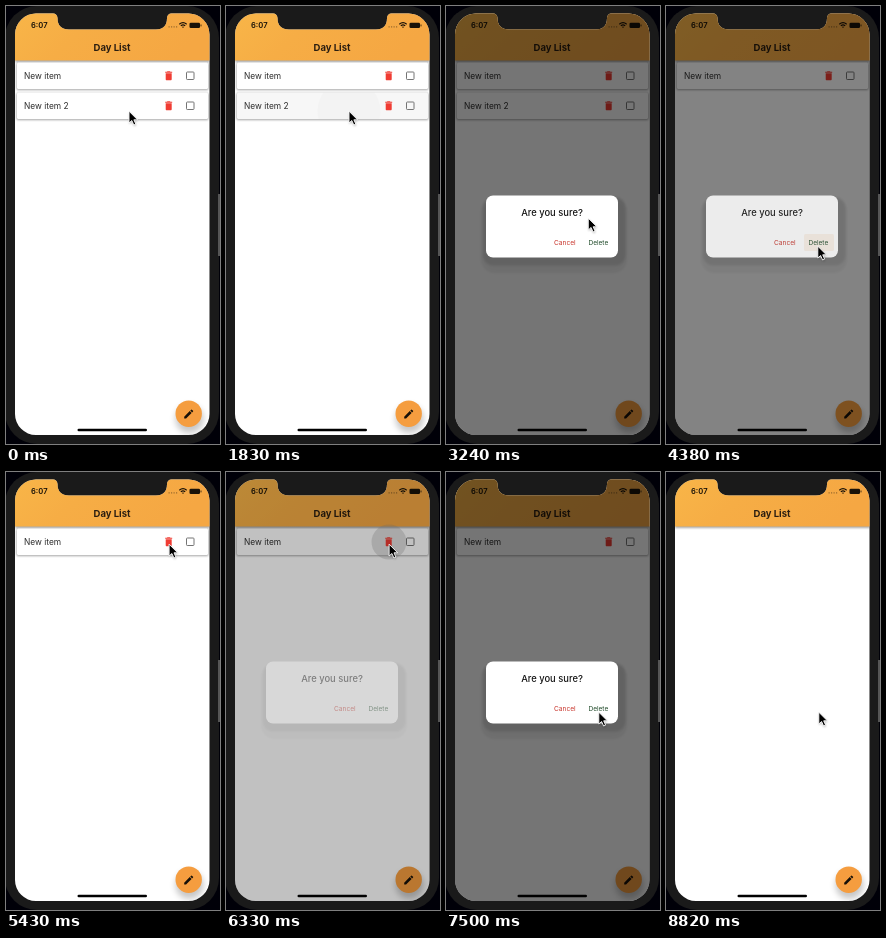
Recreate the animation shown at these times as an HTML page. Size 214 by 438 pixels, loop 9.12 s.

```html
<!DOCTYPE html>
<html lang="en">
<head>
<meta charset="utf-8">
<title>Day List</title>
<style>
  html, body { margin: 0; width: 100%; height: 100%; overflow: hidden; background: #000008; }
  svg { display: block; width: 100vw; height: 100vh; }
  text { font-family: Inter, "Open Sans", sans-serif; }
</style>
</head>
<body>
<svg viewBox="0 0 214 438">
  <defs>
    <linearGradient id="amber" x1="0" y1="0" x2="1" y2=".25">
      <stop offset="0" stop-color="#f8b548"/>
      <stop offset=".4" stop-color="#f6ad45"/>
      <stop offset="1" stop-color="#f5a743"/>
    </linearGradient>
    <clipPath id="screen">
      <path d="M9 28.500A21 21 0 0 1 30 7.500H47Q51 7.500 51.500 12Q51.500 23.400 63 23.400H150Q161 23.400 161 12Q161.500 7.500 165.500 7.500H182.500A21 21 0 0 1 203.500 28.500V408A21 21 0 0 1 182.500 429H30A21 21 0 0 1 9 408Z"/>
    </clipPath>
    <clipPath id="rowClip"><rect x="11" y="86.500" width="191" height="26.500"/></clipPath>
    <filter id="soft" x="-30%" y="-30%" width="160%" height="160%"><feGaussianBlur stdDeviation="1"/></filter>
    <filter id="wide" x="-50%" y="-50%" width="200%" height="200%"><feGaussianBlur stdDeviation="3"/></filter>
    <g id="card">
      <rect x="10.500" y="57" width="192" height="27" rx="1.500" opacity=".36" filter="url(#soft)"/>
      <rect x="11" y="56.500" width="191" height="26.500" rx="1.500" fill="#fff"/>
    </g>
    <g id="controls">
      <path transform="translate(156.700 63.800) scale(.5)" fill="#f03c33"
        d="M6 19c0 1.100.9 2 2 2h8c1.100 0 2-.9 2-2V7H6zM19 4h-3.500l-1-1h-5l-1 1H5v2h14z"/>
      <rect x="180.500" y="66" width="7.500" height="7.500" rx=".8" fill="none" stroke="#747474"/>
    </g>
  </defs>

  <rect x="-1" width="214" height="438" rx="32" fill="#1a1a1a"/>
  <rect x="212" y="188" width="2" height="62" fill="#555"/>

  <g clip-path="url(#screen)">
    <rect width="214" height="438" fill="#fff"/>
    <rect x="9" y="8" width="195" height="48" opacity=".35" filter="url(#soft)"/>
    <rect x="9" y="7" width="195" height="47.500" fill="url(#amber)"/>
    <text x="25" y="22" font-size="7.600" font-weight="600" fill="#191208">6:07</text>
    <text x="106" y="45" font-size="9.500" font-weight="700" fill="#2a1d10" text-anchor="middle">Day List</text>
    <path d="M162.500 20.800h9" stroke="#9b6b2c" stroke-width="1.200" stroke-dasharray="1.200 1.300"/>
    <g fill="none" stroke="#191208" stroke-width="1.200">
      <path d="M173.300 18.300q3.700-3.200 7.400 0M174.800 19.900q2.200-1.900 4.400 0"/>
      <path d="M176.400 21.200h1.200"/>
    </g>
    <rect x="183.500" y="16.800" width="10.500" height="5.200" rx="1.300" fill="#191208"/>
    <path d="M195 18.500v1.900" stroke="#191208" stroke-width=".8"/>

    <g id="row1">
      <use href="#card"/>
      <circle id="iconInk" cx="163" cy="70" r="0" fill="#8c8c8c"/>
      <use href="#controls"/>
      <text x="18" y="72.900" font-size="8.400" fill="#2c2c2c">New item</text>
    </g>
    <g id="row2">
      <use href="#card" y="30"/>
      <g id="rowInk" clip-path="url(#rowClip)" fill="#a8a8a8">
        <rect x="11" y="86" width="192" height="28" opacity=".5"/>
        <circle id="splash" cx="123" cy="105" r="0" opacity=".5"/>
      </g>
      <use href="#controls" y="30"/>
      <text x="18" y="102.900" font-size="8.400" fill="#2c2c2c">New item 2</text>
    </g>

    <circle cx="183.500" cy="413" r="14" opacity=".22" filter="url(#wide)"/>
    <circle cx="182.700" cy="407.700" r="13.200" fill="#f59d3f"/>
    <path transform="translate(176.700 402) scale(.5)" fill="#171008"
      d="M3 17.250V21h3.750L17.810 9.940l-3.750-3.750zM20.710 7.040a1 1 0 0 0 0-1.410l-2.340-2.340a1 1 0 0 0-1.410 0l-1.830 1.830 3.750 3.750z"/>
    <rect id="dim" width="214" height="438" opacity="0"/>
    <rect x="71.500" y="422.800" width="69.500" height="2.500" rx="1.250"/>

    <g id="dialog" opacity="0">
      <rect x="35" y="192" width="146" height="75" rx="14" opacity=".05" filter="url(#soft)"/>
      <rect x="37" y="191" width="142.500" height="68.500" rx="10" opacity=".1" filter="url(#soft)"/>
      <rect x="40" y="189.500" width="132" height="62" rx="7" fill="#fff"/>
      <rect id="press" x="138" y="228" width="30" height="17" rx="1.500" fill="#e8a860" opacity="0"/>
      <text x="106" y="209.600" font-size="9.400" font-weight="500" fill="#151515" text-anchor="middle">Are you sure?</text>
      <text x="108" y="238.700" font-size="6.600" fill="#c9352c">Cancel</text>
      <text x="142.500" y="238.700" font-size="6.500" fill="#1f4a29">Delete</text>
    </g>
  </g>

  <g id="cursor">
    <path d="M.4 1.200V13L3.200 10.500 5.200 15 7.200 14 5.300 9.800H9Z" opacity=".3" filter="url(#soft)"/>
    <path d="M0 0V11.800L2.800 9.300 4.800 13.800 6.800 12.900 4.900 8.600H8.600Z" stroke="#fff" stroke-width=".9"/>
  </g>
</svg>

<script>
const LOOP = 9120;
const FADE = 150;
const el = id => document.getElementById(id);
const set = (id, name, value) => el(id).setAttribute(name, value);
const ramp = (t, a, b) => Math.min(1, Math.max(0, (t - a) / (b - a)));
const smooth = p => p * p * (3 - 2 * p);
const easeOut = (p, power) => 1 - (1 - p) ** power;

// Dialog visits: [open, close]
const visits = [[2160, 4320], [6300, 8190]];

// Pointer moves: start, end, x, y, sideways bend
const moves = [
  [2910, 3390, 148, 244, 0],
  [3540, 3690, 151, 240.2, 0],
  [3900, 3930, 151.8, 240.2, 0],
  [4560, 5400, 163.1, 72.2, 0],
  [6690, 7500, 152.8, 240.2, 9]
];

function pointer(t) {
  let x = 123, y = 105.2;
  for (const [start, end, toX, toY, bend] of moves) {
    const p = smooth(ramp(t, start, end));
    x += (toX - x) * p + bend * 4 * p * (1 - p);
    y += (toY - y) * p;
  }
  return [x, y];
}

function draw(t) {
  let shown = 0, press = 0;
  for (const [open, close] of visits) {
    shown += ramp(t, open, open + FADE) - ramp(t, close, close + FADE);
    if (t < close + FADE) press += ramp(t, close - 60, close + 30);
  }
  set('dialog', 'opacity', easeOut(shown, 2.1));
  set('dim', 'opacity', 0.54 * easeOut(shown, 2.6));
  set('press', 'opacity', 0.14 * press);

  set('row1', 'visibility', t < visits[1][1] ? 'visible' : 'hidden');
  set('row2', 'visibility', t < visits[0][1] ? 'visible' : 'hidden');

  set('rowInk', 'opacity', 0.5 * (ramp(t, 1770, 1950) - ramp(t, 2270, 2520)));
  set('splash', 'r', 125 * easeOut(ramp(t, 1770, 2220), 2));
  set('iconInk', 'r', 17.5 * easeOut(ramp(t, 5820, 6150), 2));
  set('iconInk', 'opacity', 0.28 * (ramp(t, 5820, 5940) - ramp(t, 6370, 6460)));

  set('cursor', 'transform', `translate(${pointer(t)})`);
}

const begin = performance.now();
function tick() {
  draw((performance.now() - begin) % LOOP);
  requestAnimationFrame(tick);
}
tick();
</script>
</body>
</html>
```
